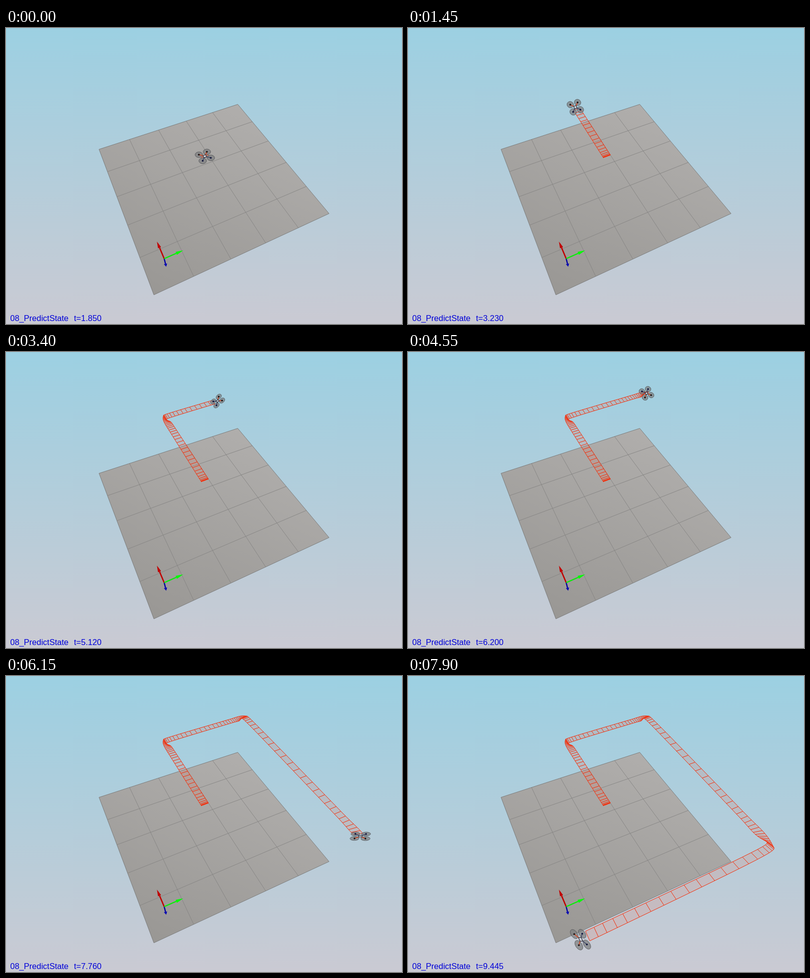
Animation of 798x599 px, one loop 8000 ms. Source, as an HTML page with a canvas:

```html
<!DOCTYPE html>
<html lang="en">
<head>
<meta charset="utf-8">
<title>Predict state</title>
<style>
  html, body { margin: 0; width: 100%; height: 100%; overflow: hidden; }
  canvas { display: block; }
</style>
</head>
<body>
<canvas id="stage" width="798" height="599"></canvas>
<script>
const ctx = document.getElementById('stage').getContext('2d');
const LOOP = 8000;

// Uneven playback: [milliseconds, step] and [step, simulated seconds].
const STEPS = [[0, 0], [50, 1], [850, 15], [950, 16], [1750, 29], [1800, 30], [2550, 42],
  [2650, 43], [3400, 56], [3500, 57], [4300, 71], [4400, 72], [5150, 86], [5250, 87],
  [6050, 100], [6100, 101], [6900, 114], [7000, 115], [7800, 128], [7900, 130]];
const CLOCK = [[0, 1.85], [24, 3.23], [56, 5.12], [75, 6.2], [102, 7.76], [118, 8.755], [130, 9.445]];

// Flight legs: start time and displacement in grid cells.
const LEGS = [[2, 3, 0], [4.03, 0, 3], [6.03, -6, 0], [8.03, 0, -6]];
const TURNS = [3.76, 5.76, 7.76];
const RATE = 5.03;

function interpolate(table, v) {
  if (v <= table[0][0]) return table[0][1];
  for (let i = 1; i < table.length; i++) {
    const [a, p] = table[i - 1], [b, q] = table[i];
    if (v <= b) return p + (q - p) * (v - a) / (b - a);
  }
  return table[table.length - 1][1];
}
const simTime = step => Math.round(interpolate(CLOCK, step) * 200) / 200;

const add = (a, b, k = 1) => a.map((v, i) => v + b[i] * k);
const dot = (a, b) => a[0] * b[0] + a[1] * b[1] + a[2] * b[2];
const unit = a => a.map(v => v / Math.hypot(...a));
const cross = (a, b) => [
  a[1] * b[2] - a[2] * b[1], a[2] * b[0] - a[0] * b[2], a[0] * b[1] - a[1] * b[0]];

// Perspective camera; x, y in cells from the near corner, z upwards.
function project([x, y, z]) {
  const w = 1 + 0.035292 * y + 0.075828 * x - 0.1074 * z;
  return [(298 + 93.576 * y - 7.882 * x - 43.3 * z) / w,
          (540 - 19.648 * y - 40.284 * x - 86.4 * z) / w];
}

// Delayed smooth response to a commanded jump, and its acceleration with limited thrust.
function response(t) {
  const x = Math.max(0, t * RATE);
  return 1 - Math.exp(-x) * (1 + x + x ** 2 / 2 + x ** 3 / 6 + x ** 4 / 24);
}
function acceleration(t) {
  const x = Math.max(0, t * RATE);
  return Math.min(0.45, x ** 3 * (4 - x) * Math.exp(-x));
}
function smooth(v) {
  const x = Math.min(1, Math.max(0, v));
  return x * x * (3 - 2 * x);
}

function pose(t) {
  const at = [2.5, 2.5, 1];
  let ax = 0, ay = 0, yaw = 0;
  for (const [start, dx, dy] of LEGS) {
    const p = response(t - start), a = acceleration(t - start);
    at[0] += dx * p;
    at[1] += dy * p;
    ax += dx * a;
    ay += dy * a;
  }
  for (const mid of TURNS) yaw += Math.PI / 2 * smooth((t - mid + 0.35) / 0.7);
  const up = unit([2 * ax, 2 * ay, 9.81]);
  const heading = [Math.cos(yaw), Math.sin(yaw), 0];
  const front = unit(add(heading, up, -dot(heading, up)));
  return { at, front, right: cross(up, front) };
}

function path(points, closed) {
  ctx.beginPath();
  points.forEach(p => ctx.lineTo(...project(p)));
  if (closed) ctx.closePath();
}
function line(points, color, width) {
  path(points);
  ctx.strokeStyle = color;
  ctx.lineWidth = width;
  ctx.stroke();
}
function gradient(x0, y0, x1, y1, from, to) {
  const g = ctx.createLinearGradient(x0, y0, x1, y1);
  g.addColorStop(0, from);
  g.addColorStop(1, to);
  return g;
}
function disc([x, y], r, color) {
  ctx.beginPath();
  ctx.arc(x, y, r, 0, 7);
  ctx.fillStyle = color;
  ctx.fill();
}

function drawScene() {
  ctx.fillStyle = gradient(0, 0, 0, 599, '#9cd0e2', '#cacad3');
  ctx.fillRect(0, 0, 798, 599);
  path([[0, 0, 0], [0, 5, 0], [5, 5, 0], [5, 0, 0]], true);
  ctx.fillStyle = gradient(467, 155, 298, 540, '#b0aeac', '#999794');
  ctx.fill();
  for (let i = 0; i <= 5; i++) {
    const color = i % 5 ? '#858483' : '#777675';
    line([[i, 0, 0], [i, 5, 0]], color, 0.9);
    line([[0, i, 0], [5, i, 0]], color, 0.9);
  }
}

function drawAxis(direction, color, headColor, thickness) {
  const origin = [0.5, 0.5, 0.48];
  const base = add(origin, direction, 0.3);
  line([origin, base], color, thickness);
  const [bx, by] = project(base), [tx, ty] = project(add(origin, direction, 0.475));
  const length = Math.hypot(tx - bx, ty - by);
  const nx = (by - ty) / length * 3.3, ny = (tx - bx) / length * 3.3;
  ctx.beginPath();
  ctx.moveTo(tx, ty);
  ctx.lineTo(bx + nx, by + ny);
  ctx.lineTo(bx - nx, by - ny);
  ctx.closePath();
  ctx.fillStyle = headColor;
  ctx.fill();
}

function drawTrail(step) {
  const left = [], right = [];
  for (let k = -1; k < step; k++) {
    const p = pose(simTime(k));
    left.push(add(p.at, p.right, -0.107));
    right.push(add(p.at, p.right, 0.107));
  }
  if (!left.length) return;
  const red = '#f42c08';
  path([...left, ...right.slice().reverse()], true);
  ctx.fillStyle = 'rgba(220,115,95,0.19)';
  ctx.fill();
  line(left, red, 1);
  line(right, red, 1);
  left.forEach((p, i) => line([p, right[i]], red, 1));
}

function drawDrone({ at, front, right }) {
  const local = (f, r) => add(add(at, front, f), right, r);
  const rotors = [[1, -1], [1, 1], [-1, 1], [-1, -1]];
  for (const [f, r] of rotors) {
    const ring = Array.from({ length: 28 }, (_, i) => {
      const a = i / 28 * 2 * Math.PI;
      return local(f * 0.12 + 0.1 * Math.cos(a), r * 0.12 + 0.1 * Math.sin(a));
    });
    path(ring, true);
    ctx.fillStyle = 'rgba(125,126,128,0.72)';
    ctx.fill();
    ctx.strokeStyle = '#4c4d50';
    ctx.lineWidth = 0.8;
    ctx.stroke();
  }
  for (const [f, r] of rotors) {
    const hub = local(f * 0.12, r * 0.12);
    line([at, hub], f > 0 ? '#d8441f' : '#454b68', 1.6);
    disc(project(hub), 1.8, f > 0 ? '#1c1414' : '#11163c');
  }
  path([local(0.04, -0.04), local(0.04, 0.04), local(-0.04, 0.04), local(-0.04, -0.04)], true);
  ctx.fillStyle = '#cfd0d6';
  ctx.fill();
  ctx.strokeStyle = '#20222e';
  ctx.lineWidth = 1.1;
  ctx.stroke();
}

function drawLabel(t) {
  ctx.font = '16.5px "Liberation Sans", Arial, sans-serif';
  ctx.fillStyle = '#0000d8';
  ctx.fillText('08_PredictState', 8.5, 592.5);
  ctx.fillText('t=' + t.toFixed(3), 137, 592.5);
}

function render() {
  const step = Math.floor(interpolate(STEPS, performance.now() % LOOP) + 0.3);
  const t = simTime(step);
  drawScene();
  drawAxis([0, 0, -1], '#0000a0', '#0000b4', 2.4);
  drawAxis([1, 0, 0], '#c00000', '#c00000', 2.6);
  drawAxis([0, 1, 0], '#00f000', '#00ff00', 2.2);
  drawTrail(step);
  drawDrone(pose(t));
  drawLabel(t);
  requestAnimationFrame(render);
}
ctx.lineJoin = 'round';
render();
</script>
</body>
</html>
```
